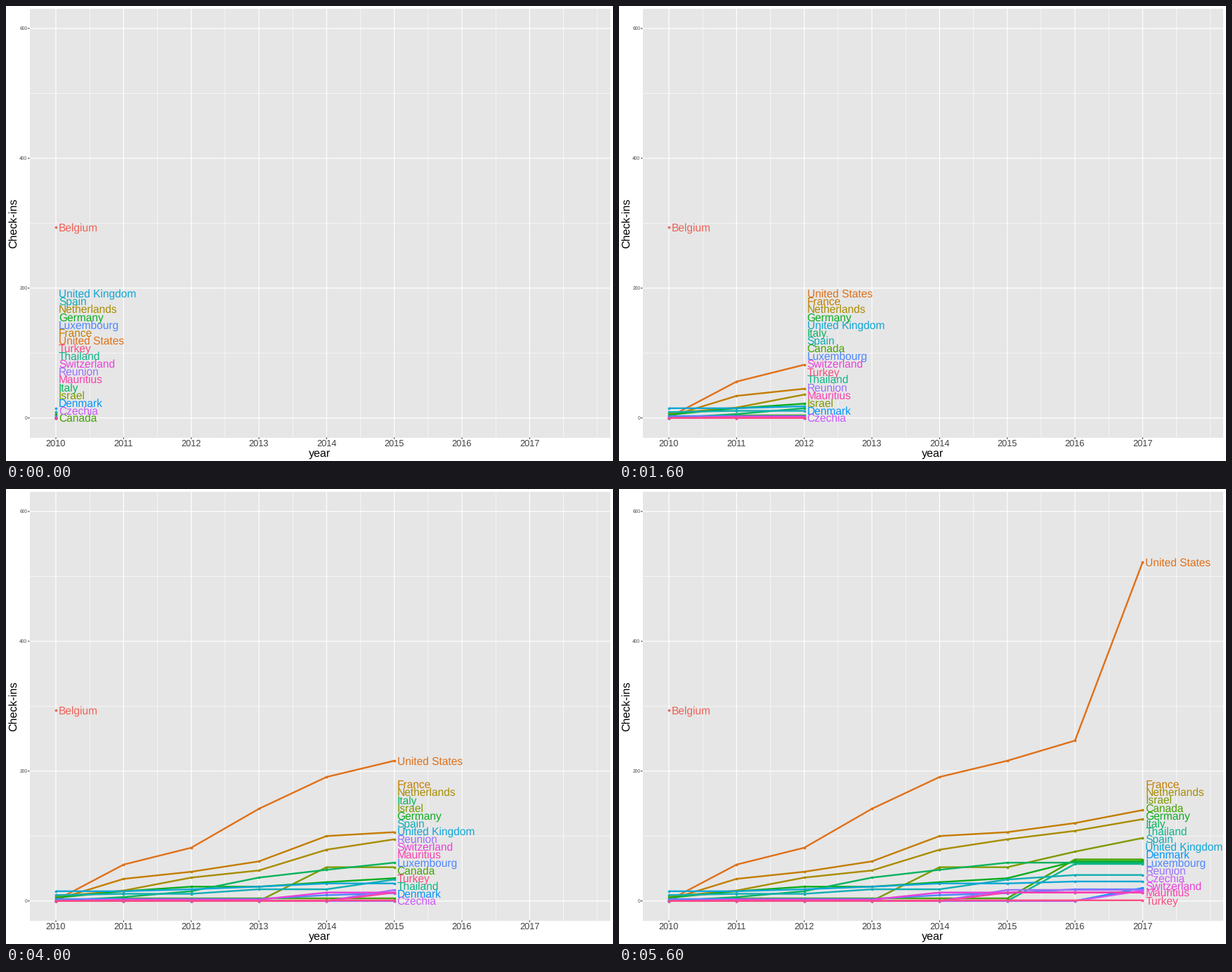
These frames come from a looping animation (864 px wide and 648 px high, 6400 ms). A matplotlib script:

```python
import matplotlib.pyplot as plt
from matplotlib.animation import FuncAnimation
from matplotlib.patches import Rectangle

W, H, DPI = 864, 648, 100
PT = 72 / DPI  # points per pixel
LEFT, RIGHT, TOP, BOTTOM = 33.5, 860, 4, 614.5
YEARS = range(2010, 2018)
LABEL_STEP, LABEL_BASE = 11.12, 587.3

plt.rcParams.update({"font.family": "Liberation Sans", "text.hinting": "none"})

# Country: colour and cumulative check-ins up to 2017; missing early years are 0
SERIES = {
    "United States": ("#E07018", [1, 56, 82, 142, 191, 216, 247, 522]),
    "France": ("#C47D00", [2, 34, 45, 61, 100, 106, 120, 140]),
    "Netherlands": ("#A98C00", [7, 16, 36, 47, 79, 95, 108, 126]),
    "Israel": ("#7F9A00", [52, 52, 76, 97]),
    "Canada": ("#43A400", [4, 4, 4, 4, 4, 64, 64]),
    "Germany": ("#0AAD1E", [5, 15, 22, 22, 29, 35, 61, 61]),
    "Italy": ("#0AB35E", [6, 15, 36, 48, 59, 59, 59]),
    "Thailand": ("#0EB58A", [57, 57]),
    "Spain": ("#12AEB4", [9, 11, 11, 18, 18, 33, 40, 40]),
    "United Kingdom": ("#0FA6D6", [15, 15, 18, 22, 27, 27, 30, 30]),
    "Denmark": ("#0096FA", [20]),
    "Luxembourg": ("#4E86FF", [3, 3, 3, 3, 9, 12, 18, 18]),
    "Reunion": ("#9A70FF", [17, 17, 17]),
    "Czechia": ("#CA59FA", [16]),
    "Switzerland": ("#EA40DA", [2, 2, 2, 13, 13, 13, 13]),
    "Mauritius": ("#FB3FAE", [13, 13, 13]),
    "Turkey": ("#FA4D82", [1, 1, 1, 1]),
}
SERIES = {name: (color, [0] * (len(YEARS) - len(v)) + v)
          for name, (color, v) in SERIES.items()}


def px(year):
    return 71 + 96.34 * (year - 2010)


def py(value):
    return 586.7 - 0.9245 * value


fig = plt.figure(figsize=(W / DPI, H / DPI), dpi=DPI, facecolor="white")
ax = fig.add_axes([0, 0, 1, 1])
ax.set(xlim=(0, W), ylim=(H, 0))
ax.axis("off")


def segment(x, y, color, width, z=1):
    return ax.plot(x, y, color=color, lw=width * PT, zorder=z, snap=False,
                   solid_capstyle="butt")[0]


def text(x, y, s, size, color, **kw):
    return ax.text(x, y, s, fontsize=size * PT, color=color, zorder=5,
                   **{"va": "baseline", **kw})


def label(x, y, name, color):
    return text(x + 4, y + 5.6, name, 15.5, color)


def dots(xs, ys, color):
    return ax.plot(xs, ys, "o", color=color, ms=3.7 * PT, mew=0, zorder=4)[0]


def draw_axes():
    ax.add_patch(Rectangle((LEFT, TOP), RIGHT - LEFT, BOTTOM - TOP,
                           fc="#E6E6E6", ec="none", zorder=0))
    for x in [px(y + 0.5) for y in YEARS] + [px(2018)]:
        segment([x, x], [TOP, BOTTOM], "white", 0.6)
    for v in (100, 300, 500):
        segment([LEFT, RIGHT], [py(v)] * 2, "white", 0.6)
    for year in YEARS:
        x = px(year)
        segment([x, x], [TOP, BOTTOM], "white", 1.2)
        segment([x, x], [BOTTOM, BOTTOM + 2.3], "#333333", 1.1)
        text(x, 627, str(year), 12.7, "#404040", ha="center")
    for v in (0, 200, 400, 600):
        y = py(v)
        segment([LEFT, RIGHT], [y, y], "white", 1.2)
        segment([LEFT - 2.3, LEFT], [y, y], "#333333", 1.1)
        text(30.3, y + 2.4, str(v), 6.6, "#404040", ha="right")
    text(446.7, 642, "year", 16, "black", ha="center")
    text(15, 309.5, "Check-ins", 16, "black", rotation=90,
         ha="right", va="center", rotation_mode="default").set_x(18)


draw_axes()
dots([px(2010)], [py(294)], "#EE6358")
label(px(2010), py(294), "Belgium", "#EE6358")

lines, points, labels = {}, {}, {}
for name, (color, _) in SERIES.items():
    lines[name] = segment([], [], color, 2.4, 3)
    points[name] = dots([], [], color)
    labels[name] = label(0, 0, name, color)


def update(i):
    xs = [px(y) for y in YEARS[:i + 1]]
    order = sorted(SERIES, key=lambda n: (SERIES[n][1][i], n))
    for name, (_, values) in SERIES.items():
        ys = [py(v) for v in values[:i + 1]]
        lines[name].set_data(xs, ys)
        points[name].set_data(xs, ys)
        # Labels stack upwards unless the value already clears the stack
        slot = LABEL_BASE - LABEL_STEP * order.index(name)
        labels[name].set_position((xs[-1] + 4, min(slot, ys[-1]) + 5.6))
    return [*lines.values(), *points.values(), *labels.values()]


anim = FuncAnimation(fig, update, frames=len(YEARS), interval=800,
                     repeat=True, repeat_delay=0, blit=False)
plt.show()
```
